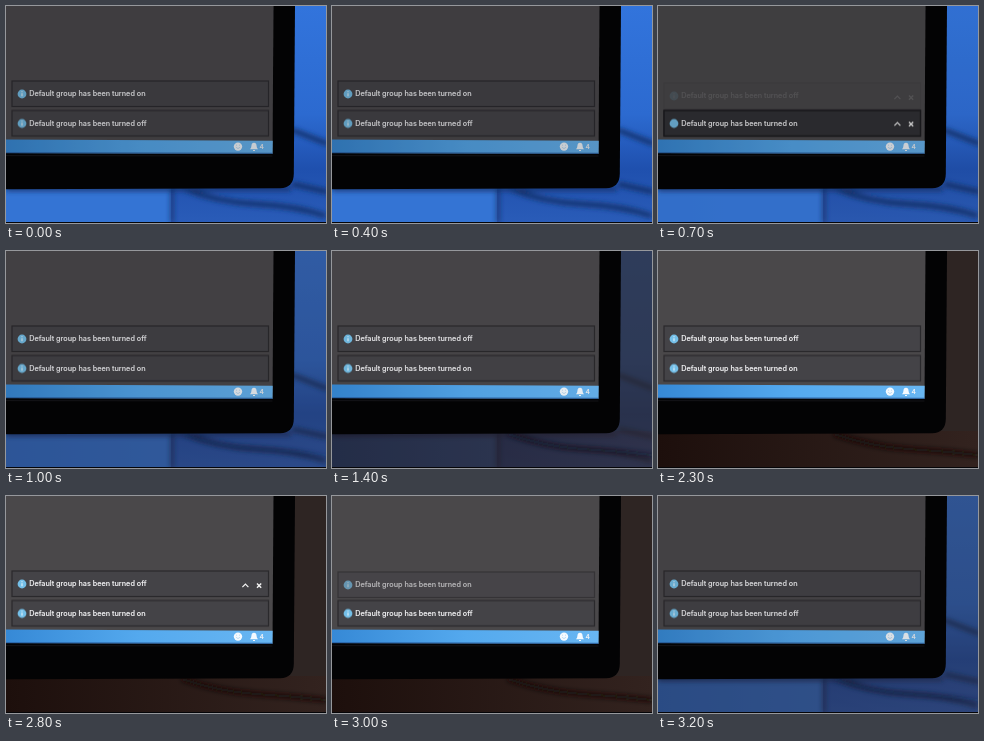
An HTML page that plays this animation: 320 by 217 pixels, repeating every 3300 ms.

```html
<!DOCTYPE html>
<html lang="en">
<head>
<meta charset="utf-8">
<title>Notification toggle</title>
<style>
html, body { margin: 0; width: 100%; height: 100%; overflow: hidden; background: #000; }
svg { display: block; width: 100vw; height: 100vh; }
text {
  font: 500 7.25px Inter, "Liberation Sans", sans-serif;
  fill: #f4f4f6; stroke: #f4f4f6; stroke-width: .15;
}
.box { fill: #444347; stroke: #2a292c; stroke-width: 1.2; }
.line { fill: none; stroke: #f4f4f4; stroke-width: 1.2; }

.light, .up-on, .up-off, .low-on, .low-off, .up-tools, .low-tools {
  animation: 3300ms step-end infinite;
}
.light { animation-name: light; }
.up-on { animation-name: up-on; }
.up-off { animation-name: up-off; }
.low-on { animation-name: low-on; }
.low-off { animation-name: low-off; }
.up-tools { animation-name: up-tools; }
.low-tools { animation-name: low-tools; }

/* room light fades out, then comes back on */
@keyframes light {
  0% { opacity: 1 }
  21.2% { opacity: .95 }
  24.2% { opacity: .88 }
  27.2% { opacity: .79 }
  30.3% { opacity: .7 }
  33.3% { opacity: .6 }
  36.3% { opacity: .5 }
  39.3% { opacity: .4 }
  42.4% { opacity: .3 }
  45.4% { opacity: .2 }
  48.4% { opacity: .12 }
  51.5% { opacity: .06 }
  54.5% { opacity: 0 }
  93.9% { opacity: .3 }
  96.9%, 100% { opacity: .6 }
}

/* a repeated message leaves the stack and returns on top */
@keyframes up-on {
  0% { opacity: 1; transform: none }
  21.2% { opacity: 0; transform: none }
  87.8% { opacity: .14; transform: translateY(2px) }
  90.9% { opacity: .65; transform: translateY(1px) }
  93.9%, 100% { opacity: 1; transform: none }
}
@keyframes up-off {
  0% { opacity: 0; transform: none }
  21.2% { opacity: .14; transform: translateY(2px) }
  24.2% { opacity: .65; transform: translateY(1px) }
  27.2% { opacity: 1; transform: none }
  87.8%, 100% { opacity: 0; transform: none }
}
@keyframes low-on {
  0% { opacity: 0 }
  21.2% { opacity: 1 }
  87.8%, 100% { opacity: 0 }
}
@keyframes low-off {
  0% { opacity: 1 }
  21.2% { opacity: 0 }
  87.8%, 100% { opacity: 1 }
}
@keyframes up-tools {
  0% { opacity: 0 }
  15.1% { opacity: 1 }
  24.2% { opacity: 0 }
  81.8% { opacity: 1 }
  90.9%, 100% { opacity: 0 }
}
@keyframes low-tools {
  0% { opacity: 0 }
  21.2% { opacity: 1 }
  24.2% { opacity: 0 }
  87.8% { opacity: 1 }
  90.9%, 100% { opacity: 0 }
}
</style>
</head>
<body>
<svg viewBox="0 0 320 217" preserveAspectRatio="none">
  <defs>
    <linearGradient id="floor">
      <stop offset="0" stop-color="#1d0f0c"/>
      <stop offset="1" stop-color="#33231f"/>
    </linearGradient>
    <linearGradient id="side" x1="0" y1="0" x2="0" y2="1">
      <stop offset="0" stop-color="#3274dc"/>
      <stop offset=".5" stop-color="#2c6ad0"/>
      <stop offset=".75" stop-color="#1f50ae"/>
      <stop offset="1" stop-color="#2a5cb8"/>
    </linearGradient>
    <linearGradient id="bar" x1="0" x2="1">
      <stop offset="0" stop-color="#3689d6"/>
      <stop offset=".5" stop-color="#54a9ee"/>
      <stop offset="1" stop-color="#68b6f2"/>
    </linearGradient>
    <filter id="soft" x="-30%" y="-30%" width="160%" height="160%">
      <feGaussianBlur stdDeviation="2.5"/>
    </filter>
    <g id="tools" class="line">
      <path d="M236.4 15.2l3-3 3 3"/>
      <path d="M251 11.5l4.2 4.2m0-4.2l-4.2 4.2" stroke-width="1.4"/>
    </g>
    <g id="toast">
      <rect class="box" x="6" width="256.5" height="25.5"/>
      <circle cx="16" cy="13" r="4.4" fill="#74bfe8"/>
      <path d="M16 12.3v3M16 10.2v1.1" stroke="#e4f4fc" stroke-width="1.1"/>
    </g>
  </defs>

  <rect width="320" height="217" fill="url(#floor)"/>
  <rect x="280" width="40" height="180" fill="#2e2523"/>
  <path d="M176 183Q215 196 250 198T320 204" fill="none" stroke="#180d0b" stroke-width="4" filter="url(#soft)"/>
  <g class="light">
    <rect width="320" height="217" fill="url(#side)"/>
    <rect y="175" width="165" height="42" fill="#3474d4"/>
    <g filter="url(#soft)" fill="none" stroke="#12306c">
      <path d="M166 180V217" stroke-width="3"/>
      <path d="M176 182Q210 196 250 198T320 210" stroke-width="5"/>
      <path d="M286 124L322 138M286 178L322 186" stroke-width="5"/>
      <path d="M0 183H285" stroke-width="4"/>
    </g>
  </g>

  <path d="M0 0H289L287.8 168Q287.6 181.8 274 182.2L0 183.2Z" fill="#030304"/>
  <path d="M0 0H267.5L266.5 148L0 147Z" fill="#4a484a"/>
  <path d="M0 133.5L266.7 134.7L266.5 147.5L0 147Z" fill="url(#bar)"/>
  <path d="M0 146.7L266.5 147.3" stroke="#2a62a4" stroke-width="1"/>
  <path d="M0 149.6L266.5 150" stroke="#1c1c20" stroke-width=".7"/>

  <g transform="translate(0 75)">
    <g class="up-on">
      <use href="#toast"/>
      <text x="23.2" y="15.4">Default group has been turned on</text>
      <use class="up-tools" href="#tools" y="1"/>
    </g>
    <g class="up-off">
      <use href="#toast"/>
      <text x="23.2" y="15.4">Default group has been turned off</text>
      <use class="up-tools" href="#tools" y="1"/>
    </g>
  </g>
  <g transform="translate(0 104.5)">
    <use href="#toast"/>
    <g class="low-tools">
      <rect x="6" width="256.5" height="25.5" fill="#303033" stroke="#19191c" stroke-width="1.4"/>
      <circle cx="16" cy="13" r="4.4" fill="#74bfe8"/>
      <use href="#tools"/>
    </g>
    <text class="low-on" x="23.2" y="15.3">Default group has been turned on</text>
    <text class="low-off" x="23.2" y="15.3">Default group has been turned off</text>
  </g>

  <g fill="#f4faff">
    <circle cx="232" cy="140.6" r="4.2"/>
    <path d="M244 143.3Q245.4 142 245.4 140Q245.6 136.9 248 136.8Q250.4 136.9 250.6 140Q250.6 142 252 143.3ZM247 144h2v.9h-2Z"/>
    <text x="253.4" y="143" style="font-size:6.6px">4</text>
  </g>
  <path d="M229.9 141.2Q232 144 234.1 141.2M230.5 138.7v1M233.5 138.7v1" fill="none" stroke="#a8d0ee" stroke-width=".7"/>

  <!-- the camera exposes the screen darker while the room is lit -->
  <path class="light" d="M0 0H267.5L266.5 148L0 147Z" fill="#14161c" fill-opacity=".2"/>
  <rect y="216" width="320" height="1" fill="#050508"/>
</svg>
</body>
</html>
```
